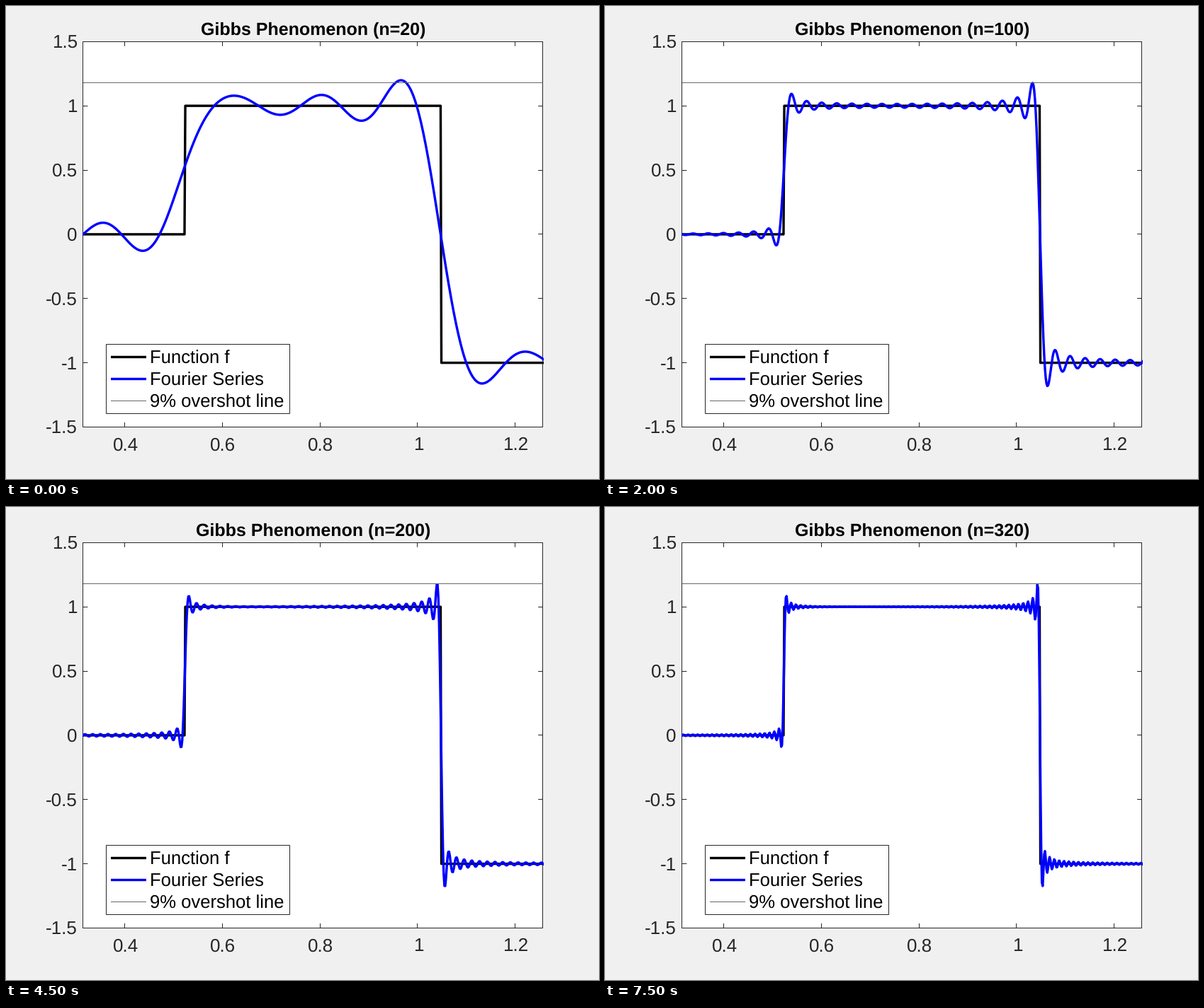
Write a matplotlib script that moves like this. It is 837 px wide and 669 px high and loops after 8000 ms.

```python
import numpy as np
import matplotlib.pyplot as plt
from matplotlib.animation import FuncAnimation
from matplotlib.patches import Rectangle

W, H, DPI = 837, 669, 64
PX = 72 / DPI  # points per pixel
LEFT, RIGHT, TOP, BOTTOM = 108.9, 757.6, 50.3, 595.5
X_MIN, X_MAX = np.pi / 10, 2 * np.pi / 5
Y_MIN, Y_MAX = -1.5, 1.5
DARK, BLUE, GREY = "#262626", "#0000ff", "#676767"
THICK = 3.4
FRAMES, STEP = 16, 20

plt.rcParams["font.family"] = "Liberation Sans"
plt.rcParams["text.hinting"] = "none"

fig = plt.figure(figsize=(W / DPI, H / DPI), dpi=DPI, facecolor="#f0f0f0")
ax = fig.add_axes([0, 0, 1, 1])
ax.set(xlim=(0, W), ylim=(H, 0))
ax.axis("off")


def to_px(x):
    return LEFT + (x - X_MIN) * (RIGHT - LEFT) / (X_MAX - X_MIN)


def to_py(y):
    return BOTTOM - (y - Y_MIN) * (BOTTOM - TOP) / (Y_MAX - Y_MIN)


def crisp(v):
    """Centre of the pixel that holds v."""
    return np.floor(v) + 0.5


def line(xs, ys, color=DARK, width=1.0, z=2):
    return ax.plot(xs, ys, color=color, lw=width * PX, zorder=z, snap=False,
                   solid_capstyle="butt", solid_joinstyle="round")[0]


def box(x0, y0, x1, y1, z, fill="white", edge=DARK):
    x0, y0, x1, y1 = map(crisp, (x0, y0, x1, y1))
    ax.add_patch(Rectangle((x0, y0), x1 - x0, y1 - y0, facecolor=fill,
                           edgecolor=edge, lw=PX, zorder=z, snap=False))


def label(x, y, text, size, **style):
    return ax.text(x, y, text, fontsize=size * PX, va="baseline", zorder=6, **style)


# Axes frame, ticks and tick labels
box(LEFT, TOP, RIGHT, BOTTOM, 0, edge="none")
box(LEFT, TOP, RIGHT, BOTTOM, 1, fill="none")
TICK = 6.5
for v in (0.4, 0.6, 0.8, 1, 1.2):
    x = crisp(to_px(v))
    line([x, x], [BOTTOM, BOTTOM - TICK])
    line([x, x], [TOP, TOP + TICK])
    label(to_px(v) + 0.8, 628.3, f"{v:g}", 26, ha="center", color=DARK)
for v in np.arange(-1.5, 1.6, 0.5):
    y = crisp(to_py(v))
    line([LEFT, LEFT + TICK], [y, y])
    line([RIGHT, RIGHT - TICK], [y, y])
    label(100.8, to_py(v) + 9.2, f"{v:g}", 26, ha="right", color=DARK)

# Sampled step function; sine coefficients are integrated on the same grid
x = np.linspace(0, np.pi / 2, 1000)
i = np.arange(x.size)
f = np.where(i < 333, 0, np.where(i <= 666, 1, -1))
k = np.arange(1, FRAMES * STEP + 1)
sines = np.sin(2 * np.outer(k, x))
b = 4 / np.pi * (x[1] - x[0]) * (sines @ f)
partial_sums = np.cumsum(b[:, None] * sines, axis=0)

clip = Rectangle((LEFT - 1, TOP), RIGHT - LEFT + 2, BOTTOM - TOP,
                 transform=ax.transData)
step = line(to_px(x), to_py(f), "black", THICK, 3)
series = line(to_px(x), to_py(partial_sums[STEP - 1]), BLUE, THICK, 4)
for curve in (step, series):
    curve.set_clip_path(clip)
line([LEFT, RIGHT], [crisp(to_py(1.18))] * 2, GREY, 1, 5)

# Legend
box(141, 478, 400, 576, 5)
for y, text, color, width in ((496.5, "Function f", "black", THICK),
                              (527.5, "Fourier Series", BLUE, THICK),
                              (558.5, "9% overshot line", GREY, 1)):
    line([148, 198], [y, y], color, width, 6)
    label(203.2, y + 8.8, text, 25.6, color="black")

title = label(434, 41.2, "", 24.95, ha="center", weight="bold", color="black")


def draw(frame):
    n = STEP * (frame + 1)
    series.set_ydata(to_py(partial_sums[n - 1]))
    title.set_text(f"Gibbs Phenomenon (n={n})")
    return series, title


anim = FuncAnimation(fig, draw, frames=FRAMES, interval=500,
                     repeat=True, repeat_delay=0)
plt.show()
```
